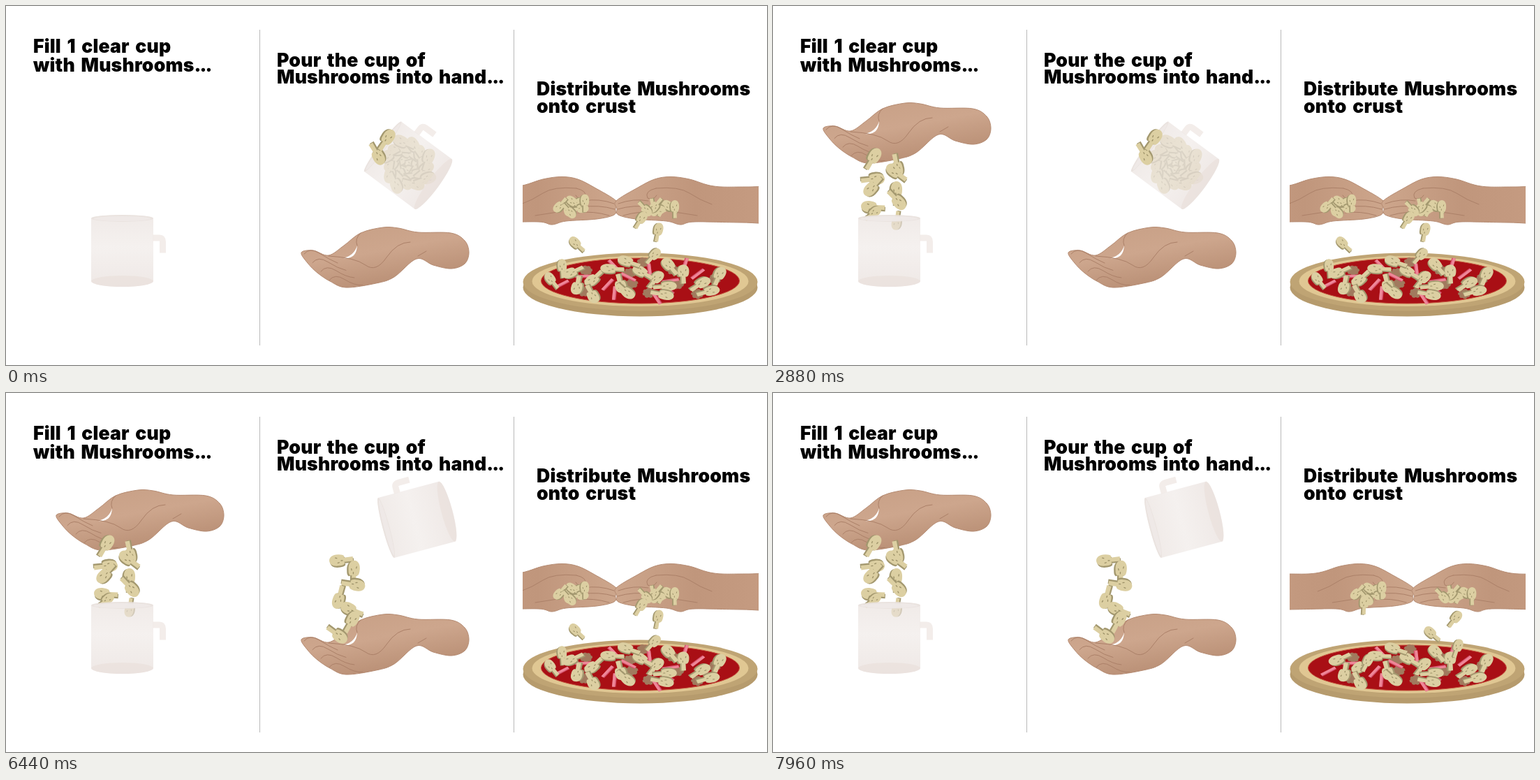
An HTML page that plays this animation: 1090 by 514 pixels, repeating every 8 s.

```html
<!DOCTYPE html>
<html lang="en">
<head>
<meta charset="utf-8">
<title>Mushrooms: cup, hand, crust</title>
<style>
  html, body { margin: 0; width: 100%; height: 100%; overflow: hidden; background: #fff; }
  svg { display: block; width: 1090px; height: 514px; }
  text { font: 900 26.6px Inter, "Open Sans", sans-serif; letter-spacing: .2px; word-spacing: 3px; }
  tspan { letter-spacing: -2px; }
  .skin { stroke: #b58b72; }
  .crease { fill: none; stroke: #ab8068; stroke-linecap: round; }
</style>
</head>
<body>
<svg viewBox="0 0 1090 514">
  <defs>
    <linearGradient id="skin" x1="0" y1="0" x2=".5" y2="1">
      <stop offset="0" stop-color="#c79f85"/><stop offset=".5" stop-color="#cda68d"/><stop offset="1" stop-color="#b88e74"/>
    </linearGradient>
    <linearGradient id="arm" x1="0" x2="1">
      <stop offset="0" stop-color="#cda68c"/><stop offset=".35" stop-color="#c0967c"/><stop offset=".7" stop-color="#c69c82"/>
    </linearGradient>
    <linearGradient id="glass" x1="0" y1="0" x2="0" y2="1">
      <stop offset="0" stop-color="#e8dfdb"/><stop offset=".45" stop-color="#efe9e6"/><stop offset="1" stop-color="#e6dcd8"/>
    </linearGradient>
    <clipPath id="frame"><rect x="740" y="200" width="338" height="260"/></clipPath>

    <path id="slice" d="M-8 -3C-9 -12 -5 -17 0 -17S9 -12 8 -3C7.500 5 4 6 3 4L3.500 17H-3V4C-5 6 -8 4 -8 -3Z"/>
    <g id="mushroom">
      <use href="#slice" x="-2.300" y="1" fill="#a3986f"/>
      <use href="#slice" fill="#dccfa2"/>
      <path d="M-4 -5l.5 2M3.500 -8l-.5 2M-1 0v2" stroke="#9a8f66" stroke-width="1.300" stroke-linecap="round"/>
    </g>

    <g id="cup">
      <path d="M44 -18.500H53Q58 -18.500 58 -13V3" fill="none" stroke="#f3edea" stroke-width="9"/>
      <path d="M-44.500 -46.500V43.500A44.500 8 0 0 0 44.500 43.500V-46.500A44.500 5 0 0 0 -44.500 -46.500Z" fill="url(#glass)" opacity=".65"/>
      <ellipse cy="-46.500" rx="44.500" ry="5" fill="#e9e1de" opacity=".8"/>
      <ellipse cy="-46" rx="41" ry="3.500" fill="#f1ecea" opacity=".8"/>
      <ellipse cy="43.500" rx="44.500" ry="8" fill="#e9dfdb" opacity=".6"/>
    </g>

    <g id="hand">
      <path id="handShape" class="skin" fill="url(#skin)"/>
      <path fill="#fff" d="M483 361Q499 357 503 343Q502 363 483 361Z"/>
      <path id="fingers" class="crease"/>
      <path class="crease" d="M462 358Q500 360 515 371T545 360T579 338M508 325Q499 333 503 343M590 358L602 351"/>
    </g>

    <g id="palm">
      <path id="palmShape" class="skin" fill="url(#arm)"/>
      <path class="crease" d="M57 261Q40 265 45 275Q53 279 58 271M57 261Q90 258 105 268T137 284M3 283Q25 275 46 279M2 291Q25 284 50 288M10 300Q33 293 55 296M84 295L116 300"/>
    </g>
  </defs>

  <path d="M363.500 34V486M727.500 34V486" stroke="#b9b9b9"/>
  <text x="39" y="67">Fill 1 clear cup</text>
  <text x="39" y="94">with Mushrooms<tspan>...</tspan></text>
  <text x="388" y="87">Pour the cup of</text>
  <text x="388" y="111">Mushrooms into hand<tspan>...</tspan></text>
  <text x="760" y="128">Distribute Mushrooms</text>
  <text x="760" y="153">onto crust</text>

  <g id="fill">
    <use href="#hand" x="-351" y="-178"/>
    <g id="filling"></g>
  </g>
  <use href="#cup" x="166.500" y="350.500"/>

  <use href="#hand"/>
  <g id="pourCup"><g id="contents"></g><use href="#cup"/></g>
  <g id="pouring"></g>

  <g clip-path="url(#frame)">
    <ellipse cx="908.500" cy="403" rx="168" ry="41.500" fill="#b69b6d"/>
    <ellipse cx="908.500" cy="395" rx="168" ry="41.500" fill="#bfa474"/>
    <ellipse cx="908.500" cy="394" rx="155" ry="36" fill="#e0c793"/>
    <ellipse cx="908.500" cy="393.500" rx="142" ry="32.500" fill="#a90f15" stroke="#c4513c"/>
    <g id="toppings"></g>
    <g id="left"><use href="#palm" transform="scale(-1 1)"/><g id="leftHeap"></g></g>
    <g id="right"><use href="#palm"/><g id="rightHeap"></g></g>
    <g id="dropping"></g>
  </g>
</svg>

<script>
const $ = id => document.getElementById(id);
const clamp = v => Math.max(0, Math.min(1, v));
const span = (t, a, b) => clamp((t - a) / (b - a));
const easeOut = (p, n = 3) => 1 - (1 - p) ** n;
const smooth = p => p * p * (3 - 2 * p);
const mix = (a, b, p) => a.map((v, i) => v + (b[i] - v) * p);
const times = (n, make) => Array.from({ length: n }, (_, i) => make(i));

// Closed smooth curve through "x,y x,y ..." points.
function outline(text) {
  const pts = text.split(' ').map(p => p.split(',').map(Number));
  const at = i => pts[(i + pts.length) % pts.length];
  const bend = (i, dir) => at(i).map((v, k) => v + dir * (at(i + 1)[k] - at(i - 1)[k]) / 6);
  return `M${at(0)}` + pts.map((_, i) => `C${bend(i, 1)} ${bend(i + 1, -1)} ${at(i + 1)}`).join('') + 'Z';
}

$('handShape').setAttribute('d', outline('423,353 440,350 462,357 484,343 508,325 540,317 562,318 590,324 ' +
  '637,325 657,336 663,353 657,369 638,376 612,371 588,362 556,388 530,397 487,403 464,394 446,382 432,368'));
$('palmShape').setAttribute('d', outline('0,279 31,260 55,248 78,244.5 105,248 140,258 190,259 310,258 ' +
  '310,311 180,310 112,309 92,313 72,308 28,305 3,299 1,290'));
$('fingers').setAttribute('d', times(4, i => `M${427 + 12 * i} ${355 + 12.5 * i}q8 -10 22 -1t26 ${14 - 2 * i}`).join(''));

// A pose is [x, y, turn, scale]; at turn 0 a mushroom's cap points up.
function place(el, [x, y, turn = 0, scale = 1], opacity = 1) {
  el.setAttribute('transform', `translate(${x} ${y}) rotate(${turn}) scale(${scale})`);
  el.setAttribute('opacity', opacity);
}

function addMushrooms(id, poses) {
  return poses.map(pose => {
    const el = document.createElementNS('http://www.w3.org/2000/svg', 'use');
    el.setAttribute('href', '#mushroom');
    $(id).append(el);
    place(el, pose);
    return el;
  });
}

// Even spread over an ellipse by the golden angle.
const scatter = (n, cx, cy, rx, ry, scale = 1, phase = 0) => times(n, i => {
  const r = Math.sqrt((i + .5) / n), a = i * 2.4 + phase;
  return [cx + rx * r * Math.cos(a), cy + ry * r * Math.sin(a), 32 + i * 137.5, scale];
});

const topping = (n, phase, shape) => scatter(n, 908, 392, 130, 27, 1, phase).map(([x, y, turn]) =>
  `<g transform="translate(${x} ${y}) scale(1 .8) rotate(${turn})">${shape}</g>`).join('');
$('toppings').innerHTML =
  topping(11, 2, '<circle r="8" fill="#a17a5e" stroke="#a17a5e" stroke-width="2" stroke-dasharray="4 3"/>') +
  topping(13, 4, '<rect x="-12" y="-2.500" width="24" height="5.500" fill="#d4506b"/>' +
                 '<rect x="-12" y="-2.500" width="24" height="4" fill="#ee8798"/>') +
  topping(17, 0, '<use href="#mushroom"/>');

addMushrooms('leftHeap', scatter(7, -62, 286, 23, 8, .75));
addMushrooms('rightHeap', scatter(7, 64, 289, 25, 5, .75, 1));
addMushrooms('contents', scatter(20, 0, -3, 34, 34, .95));

const held = scatter(10, 156, 183, 24, 14);
const fallen = held.map(([, , turn], i) =>
  [160 + 24 * Math.sin(Math.PI / 2 * (i - .5)), 219 + 9.8 * i, turn, i < 8 ? 1 : .8]);

const poured = times(7, i => {
  const x = 502 - i - 13 * Math.cos(i * Math.PI * 2 / 3), y = 230 + 14.5 * i, turn = 97 * i - 65;
  return {
    from: [531 + 14 * (i % 2), 212 - 20 * (i % 2), 150 - 115 * (i % 2)],
    mid: [x, y, turn],
    to: [x - 9, y + 9 + 3.3 * i, turn - 30]
  };
});

// Two bursts of six drops, each let go at an offset from where the hands meet.
const meet = s => 874 + 30.75 * (1 - Math.cos(Math.PI * Math.max(0, s) / 1113));
const drops = [-92, -77, 53, -56, 60, 35, -103, -64, 53, 10, 42, -81].map((offset, i) => {
  const start = i < 6 ? -900 + 144 * i : 503 + 173 * (i - 6);
  return { start, x: meet(start) + offset, turn: 50 * Math.sin(2.2 * i + 4) };
});

const filling = addMushrooms('filling', held);
const pouring = addMushrooms('pouring', poured.map(p => p.from));
const dropping = addMushrooms('dropping', drops.map(d => [d.x, 285]));

function drawFill(t) {
  const come = easeOut(span(t, 1040, 1760));
  place($('fill'), [22 * (1 - come), 6 * (1 - come)], come);
  const fall = easeOut(span(t, 1860, 2880));
  filling.forEach((el, i) => place(el, mix(held[i], fallen[i], fall)));
}

function drawPour(t) {
  const tip = smooth(span(t, 4200, 4860));
  place($('pourCup'), mix([577, 229, -53.5], [589.5, 181, -105], tip));
  $('contents').setAttribute('opacity', .8 * (1 - span(t, 4280, 4800)));
  const out = span(t, 4200, 4880);
  const settle = easeOut(span(t, 4880, 5520), 4.5);
  pouring.forEach((el, i) => {
    const { from, mid, to } = poured[i];
    const pose = out < 1 ? mix(from, mid, out) : mix(mid, to, settle);
    place(el, pose, i < 2 ? 1 : span(t, 4200, 4500));
  });
}

function drawSpread(t) {
  const s = Math.max(0, t - 6440);
  place($('left'), [meet(s), 0]);
  place($('right'), [meet(s), 0]);
  dropping.forEach((el, i) => {
    const { start, x, turn } = drops[i];
    const y = 285 + .12 * (s - start);
    place(el, [x, y, turn, .8], clamp((y - 285) / 8) * clamp((406 - y) / 10));
  });
}

function draw(now) {
  const t = now % 8000;
  drawFill(t);
  drawPour(t);
  drawSpread(t);
  requestAnimationFrame(draw);
}
requestAnimationFrame(draw);
</script>
</body>
</html>
```
